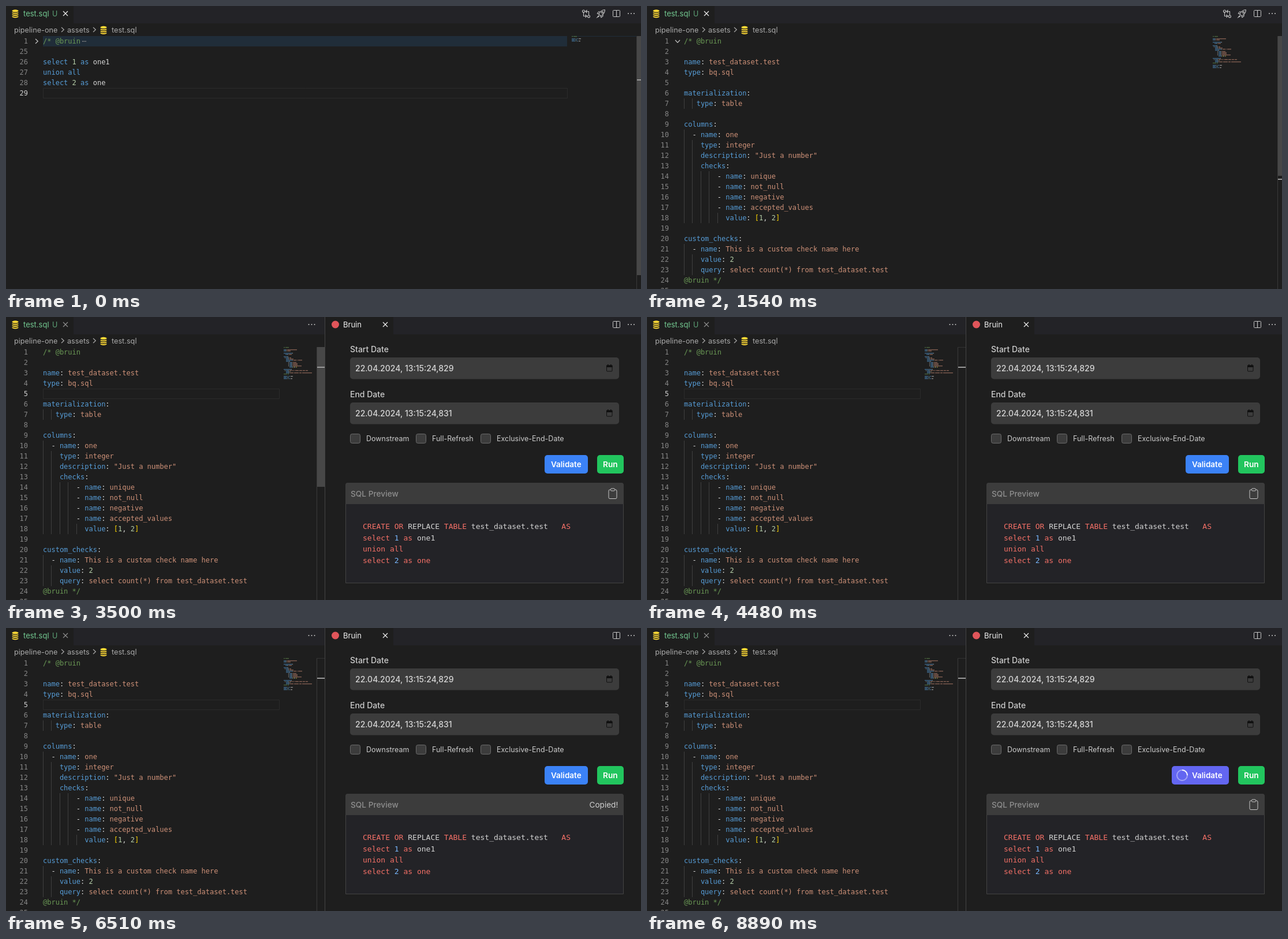
An HTML page with a canvas for the animation above (8960 ms loop, 1100 by 490 pixels).

```html
<!DOCTYPE html>
<html lang="en">
<head>
<meta charset="utf-8">
<title>SQL editor</title>
<style>
  html, body { margin: 0; width: 100%; height: 100%; overflow: hidden; background: #1e1e1e; }
  canvas { display: block; }
</style>
</head>
<body>
<canvas id="stage" width="1100" height="490"></canvas>
<script>
const ctx = document.getElementById('stage').getContext('2d');
const LOOP = 8960, STEP = 70;
const UI = 'Inter, sans-serif', MONO = '"DejaVu Sans Mono", monospace';
const BG = '#1e1e1e', BAR = '#232327', FIELD = '#3c3c3c';
const BLUE = '#569cd6', ORANGE = '#ce9178', GREEN = '#6a9955', NUM = '#b5cea8', WHITE = '#d4d4d4', GOLD = '#ffd700';
const RED = '#f47067', SKY = '#79b8ff';
const TOP = 52, ROW = 18, CODE_X = 64, CHAR = 7.224;

const source = `/* @bruin

name: test_dataset.test
type: bq.sql

materialization:
   type: table

columns:
  - name: one
    type: integer
    description: "Just a number"
    checks:
        - name: unique
        - name: not_null
        - name: negative
        - name: accepted_values
          value: [1, 2]

custom_checks:
  - name: This is a custom check name here
    value: 2
    query: select count(*) from test_dataset.test
@bruin */

select 1 as one1
union all
select 2 as one
`.split('\n');

const words = (text, color) => text.split(/(\w+|[^\w\s])/).filter(Boolean).map(w => [w, color(w)]);

function tokens(line) {
  if (line.includes('@bruin')) return [[line, GREEN]];
  const m = line.match(/^(\s*)(- )?(\w+)(:)(.*)$/);
  if (!m) return words(line, w => /^(select|union|all|as)$/.test(w) ? BLUE : /^\d/.test(w) ? NUM : WHITE);
  const value = /^ [\[\d]/.test(m[5])
    ? words(m[5], w => /\d/.test(w) ? NUM : /[\[\]]/.test(w) ? GOLD : WHITE)
    : [[m[5], ORANGE]];
  return [[m[1], WHITE], [m[2] || '', WHITE], [m[3], BLUE], [m[4], WHITE], ...value];
}

const fullDoc = source.map((text, i) => ({ n: i + 1, text, parts: tokens(text) }));
const foldedDoc = fullDoc.filter(l => l.n === 1 || l.n > 24);

const preview = [
  [['CREATE OR ', RED], ['REPLACE ', WHITE], ['TABLE ', RED], ['test_dataset.test   ', WHITE], ['AS', RED]],
  [['select ', RED], ['1 ', SKY], ['as ', RED], ['one1', WHITE]],
  [['union all', RED]],
  [['select ', RED], ['2 ', SKY], ['as one', RED]]
];

function rect(x, y, w, h, color) {
  ctx.fillStyle = color;
  ctx.fillRect(x, y, w, h);
}

function box(x, y, w, h, r, fill, stroke) {
  ctx.beginPath();
  ctx.roundRect(x, y, w, h, r);
  if (fill) { ctx.fillStyle = fill; ctx.fill(); }
  if (stroke) { ctx.strokeStyle = stroke; ctx.lineWidth = 1; ctx.stroke(); }
}

function label(text, x, y, size, color, weight = 400, family = UI) {
  ctx.font = `${weight} ${size}px ${family}`;
  ctx.fillStyle = color;
  ctx.fillText(text, x, y);
}

function runs(parts, x, y, size) {
  const advance = size * CHAR / 12;
  for (const [text, color] of parts) {
    label(text, x, y, size, color, 400, MONO);
    x += text.length * advance;
  }
}

function path(points, color, width = 1.1, close = false) {
  ctx.beginPath();
  points.forEach(([x, y]) => ctx.lineTo(x, y));
  if (close) ctx.closePath();
  ctx.strokeStyle = color;
  ctx.lineWidth = width;
  ctx.stroke();
}

function disc(x, y, r, fill, stroke) {
  ctx.beginPath();
  ctx.arc(x, y, r, 0, 7);
  if (fill) { ctx.fillStyle = fill; ctx.fill(); }
  if (stroke) { ctx.strokeStyle = stroke; ctx.lineWidth = 1.1; ctx.stroke(); }
}

function cross(x, y, color) {
  path([[x - 4, y - 4], [x + 4, y + 4]], color, 1.2);
  path([[x + 4, y - 4], [x - 4, y + 4]], color, 1.2);
}

function chevron(x, y, color, down) {
  path(down ? [[x - 4, y - 2], [x, y + 2.3], [x + 4, y - 2]] : [[x - 2, y - 4], [x + 2.3, y], [x - 2, y + 4]], color, 1.2);
}

function dots(x, y) {
  for (let i = -1; i < 2; i++) disc(x + i * 5, y, 1, '#c5c5c5');
}

function database(x, y) {
  for (let i = 3; i >= 0; i--) {
    const cy = y - 4.6 + i * 3.3;
    ctx.beginPath();
    ctx.ellipse(x, cy, 5.6, 2.1, 0, 0, 7);
    ctx.fillStyle = '#fdd835';
    ctx.fill();
    if (i) {
      ctx.beginPath();
      ctx.ellipse(x, cy - 2, 6, 2.1, 0, 0, 7);
      ctx.fillStyle = BG;
      ctx.fill();
    }
  }
}

function splitIcon() {
  box(1051.5, 7.5, 12, 11, 1, null, '#c5c5c5');
  path([[1057.5, 7.5], [1057.5, 18.5]], '#c5c5c5');
}

function compareIcon() {
  const c = '#c5c5c5';
  disc(1000.5, 9, 2, null, c);
  disc(1009.5, 18, 2, null, c);
  path([[1000.5, 11], [1000.5, 17.5], [1005.5, 17.5]], c);
  path([[1003.5, 15], [1006, 17.5], [1003.5, 20]], c);
  path([[1009.5, 16], [1009.5, 9.5], [1004.5, 9.5]], c);
  path([[1006.5, 7], [1004, 9.5], [1006.5, 12]], c);
}

function rocketIcon() {
  const c = '#c5c5c5';
  ctx.beginPath();
  ctx.moveTo(1037.5, 6.5);
  ctx.quadraticCurveTo(1031, 6.5, 1026.8, 14);
  ctx.lineTo(1030.2, 17.4);
  ctx.quadraticCurveTo(1037.5, 13, 1037.5, 6.5);
  ctx.strokeStyle = c;
  ctx.lineWidth = 1.1;
  ctx.stroke();
  disc(1033, 11, 1.4, null, c);
  path([[1029.5, 10], [1026.5, 10], [1024.3, 13], [1027, 14]], c);
  path([[1034, 14.5], [1034, 17.5], [1031, 19.8], [1030.2, 17.4]], c);
  path([[1027, 16], [1024.3, 19.5], [1028, 17.4]], c);
}

function clipboardIcon() {
  box(1044, 299, 14, 15.5, 2, null, '#c8c8c8');
  box(1047.5, 297, 7, 4, 1.5, FIELD, '#c8c8c8');
}

function calendarIcon(y) {
  box(1040.5, y - 4.5, 9.5, 10, 1, null, '#101010');
  rect(1040, y - 5, 10.5, 3.5, '#101010');
  rect(1042, y - 6.5, 1.5, 2, '#101010');
  rect(1047, y - 6.5, 1.5, 2, '#101010');
}

function minimap(doc, x) {
  ctx.globalAlpha = 0.55;
  doc.forEach((line, row) => {
    let cx = x;
    for (const [text, color] of line.parts)
      for (const ch of text) {
        if (ch !== ' ') rect(cx, TOP + row * 2, 1, 1.4, color);
        cx++;
      }
  });
  ctx.globalAlpha = 1;
}

function editor(s) {
  const edge = s.split ? 552 : 1100;
  const codeEnd = s.split ? 473 : 972, mapX = s.split ? 481 : 980, rulerX = s.split ? 538 : 1092;
  const doc = s.folded ? foldedDoc : fullDoc;
  ctx.save();
  ctx.beginPath();
  ctx.rect(0, 0, edge, 490);
  ctx.clip();
  rect(0, 0, edge, 490, BG);
  rect(117, 0, edge, 30, BAR);

  database(16, 13);
  label('test.sql', 30, 17.5, 13, '#73c991');
  label('U', 80, 17.5, 12.5, '#5da377');
  cross(103, 13, s.split ? '#8a8a8a' : '#e8e8e8');

  label('pipeline-one', 14, 46, 12.7, '#a9a9a9');
  chevron(98, 41, '#a9a9a9');
  label('assets', 106, 46, 12.7, '#a9a9a9');
  chevron(153, 41, '#a9a9a9');
  database(169, 41.5);
  label('test.sql', 183, 46, 12.7, '#a9a9a9');

  if (s.folded) {
    rect(CODE_X, TOP, codeEnd - CODE_X, ROW, '#202d39');
    rect(mapX, TOP, rulerX - mapX, 1, '#202d39');
  }
  doc.forEach((line, row) => {
    const y = TOP + row * ROW;
    if (y > 490) return;
    const active = line.n === s.active;
    if (active) box(CODE_X + .5, y + .5 - (s.folded ? 0 : 0), codeEnd - CODE_X, ROW - 1, 0, null, '#2b2b2b');
    ctx.textAlign = 'right';
    label(line.n, 38, y + 13, 12, active ? '#d0d0d0' : '#858585', 400, MONO);
    ctx.textAlign = 'left';
    const indent = line.text.search(/\S/);
    for (let i = 0; i < indent; i += 2) rect(Math.round(CODE_X + i * CHAR), y, 1, ROW, '#404040');
    runs(line.parts, CODE_X, y + 13, 12);
  });
  if (s.folded) {
    for (let i = 0; i < 3; i++) rect(132 + i * 2.6, 60.5, 1.6, 1.5, '#8a8a8a');
  }
  if (s.chevron > 0) {
    ctx.globalAlpha = s.chevron;
    chevron(53, 61, '#c5c5c5', !s.folded);
    ctx.globalAlpha = 1;
  }
  if (s.caret) rect(CODE_X, TOP + 4 * ROW, 2, ROW, '#aeafad');

  minimap(doc, mapX);
  rect(rulerX, TOP, 1, 490 - TOP, '#3a3a3a');
  rect(rulerX, TOP, 14, 1, '#333333');
  if (s.slider > 0) {
    ctx.globalAlpha = s.slider;
    rect(rulerX + 1, TOP, 13, s.folded ? 414 : 242, '#474747');
    ctx.globalAlpha = 1;
  }
  rect(rulerX + 1, s.mark, 14, 2, '#9a9a9a');

  if (s.split) dots(529.5, 13);
  else {
    if (s.hover) box(s.hover, 2, 22, 22, 5, '#38383c');
    compareIcon();
    rocketIcon();
    splitIcon();
    dots(1083, 13);
  }
  ctx.restore();
}

function dateField(title, value, y) {
  label(title, 596, y - 9, 14, '#cccccc', 500);
  box(596, y, 466, 37.5, 5, FIELD);
  label(value, 605, y + 23.5, 14, '#d6d6d6', 500);
  calendarIcon(y + 18.5);
}

function checkbox(text, x, textX) {
  box(x + .5, 202.5, 17, 16, 3, FIELD, '#6b6b6b');
  label(text, textX, 215, 12.5, '#cccccc');
}

function spinner(angle) {
  ctx.lineWidth = 2;
  ctx.strokeStyle = 'rgba(255,255,255,.4)';
  ctx.beginPath();
  ctx.arc(927, 255, 9, 0, 7);
  ctx.stroke();
  ctx.strokeStyle = 'rgba(255,255,255,.9)';
  ctx.beginPath();
  ctx.arc(927, 255, 9, angle, angle + Math.PI / 2);
  ctx.stroke();
}

function mix(a, b, k) {
  return `rgb(${a.map((v, i) => Math.round(v + (b[i] - v) * k))})`;
}

function panel(s) {
  rect(552, 0, 548, 490, BG);
  rect(671, 0, 429, 30, BAR);
  rect(552, 0, 1, 490, '#444444');
  disc(570.5, 13, 6.5, '#e0555a');
  label('Bruin', 584, 17.5, 13, '#f0f0f0');
  cross(657, 13, '#e8e8e8');
  splitIcon();
  dots(1083, 13);
  if (!s.loaded) return;

  dateField('Start Date', '22.04.2024, 13:15:24,829', 70);
  dateField('End Date', '22.04.2024, 13:15:24,831', 148);
  checkbox('Downstream', 596, 624);
  checkbox('Full-Refresh', 710, 738);
  checkbox('Exclusive-End-Date', 822, 850);

  const left = s.busy ? 909 : 933;
  box(left, 239, 1008 - left, 32, 5, mix([59, 130, 246], [99, 102, 241], s.tint));
  label('Validate', 944, 260, 13.5, '#ffffff', 600);
  if (s.busy) spinner(s.angle);
  box(1024, 239, 46, 32, 5, '#22c55e');
  label('Run', 1034, 260, 13.7, '#ffffff', 600);

  box(588.5, 287.5, 481, 173, [4, 4, 0, 0], BAR, '#434343');
  box(588, 287, 482, 37, [4, 4, 0, 0], FIELD);
  label('SQL Preview', 597, 311, 13.7, '#8f8f8f', 500);
  if (s.copied) label('Copied!', 1010.5, 311, 13.6, '#d0d0d0');
  else clipboardIcon();
  preview.forEach((parts, i) => runs(parts, 618, 367 + i * 19.6, 13));
}

function pointer(x, y, scale) {
  ctx.save();
  ctx.translate(x, y);
  ctx.scale(scale, scale);
  ctx.beginPath();
  [[0.4, 0.6], [0.4, 16], [4, 12.8], [6.3, 18.4], [9, 17.2], [6.7, 11.8], [11.4, 11.6]].forEach(([px, py]) => ctx.lineTo(px, py));
  ctx.closePath();
  ctx.fillStyle = '#000000';
  ctx.fill();
  ctx.strokeStyle = '#ffffff';
  ctx.lineWidth = 1.1;
  ctx.stroke();
  ctx.restore();
}

const ramp = (t, from, to) => Math.min(1, Math.max(0, (t - from) / (to - from)));

function sliderAlpha(t) {
  if (t < 980) return 1;
  if (t < 1470) return 0;
  if (t < 3360) return 1 - 0.75 * ramp(t, 2030, 2310);
  return 1 - ramp(t, 4340, 4480);
}

function stateAt(t) {
  const folded = t < 1470, clicked = t >= 2100;
  return {
    folded,
    active: folded ? 29 : clicked ? 5 : 0,
    mark: folded ? 127 : clicked ? 86 : 299,
    chevron: 1 - ramp(t, 2030, 2310),
    caret: clicked && t < 2800,
    slider: sliderAlpha(t),
    hover: t >= 3010 ? 1020 : t >= 2800 ? 1047 : 0,
    split: t >= 3360,
    loaded: t >= 3430,
    copied: t >= 4970 && t < 7000,
    tint: ramp(t, 6930, 7140),
    busy: t >= 8050,
    angle: (t - 8050 - 840) / 1000 * 2 * Math.PI - Math.PI / 2
  };
}

function draw(now) {
  const t = Math.floor((now % LOOP) / STEP) * STEP;
  const s = stateAt(t);
  editor(s);
  if (s.split) panel(s);
  if (t >= 6020 && t < 6510) {
    const p = (t - 6020) / 490, swing = Math.sin(Math.PI * p);
    pointer(671 + 93 * swing, 359 + 51 * swing, 2.85 * (1 - 0.65 * ramp(p, .6, 1)));
  }
}

const start = performance.now();
function tick() {
  draw(performance.now() - start);
  requestAnimationFrame(tick);
}
tick();
</script>
</body>
</html>
```
